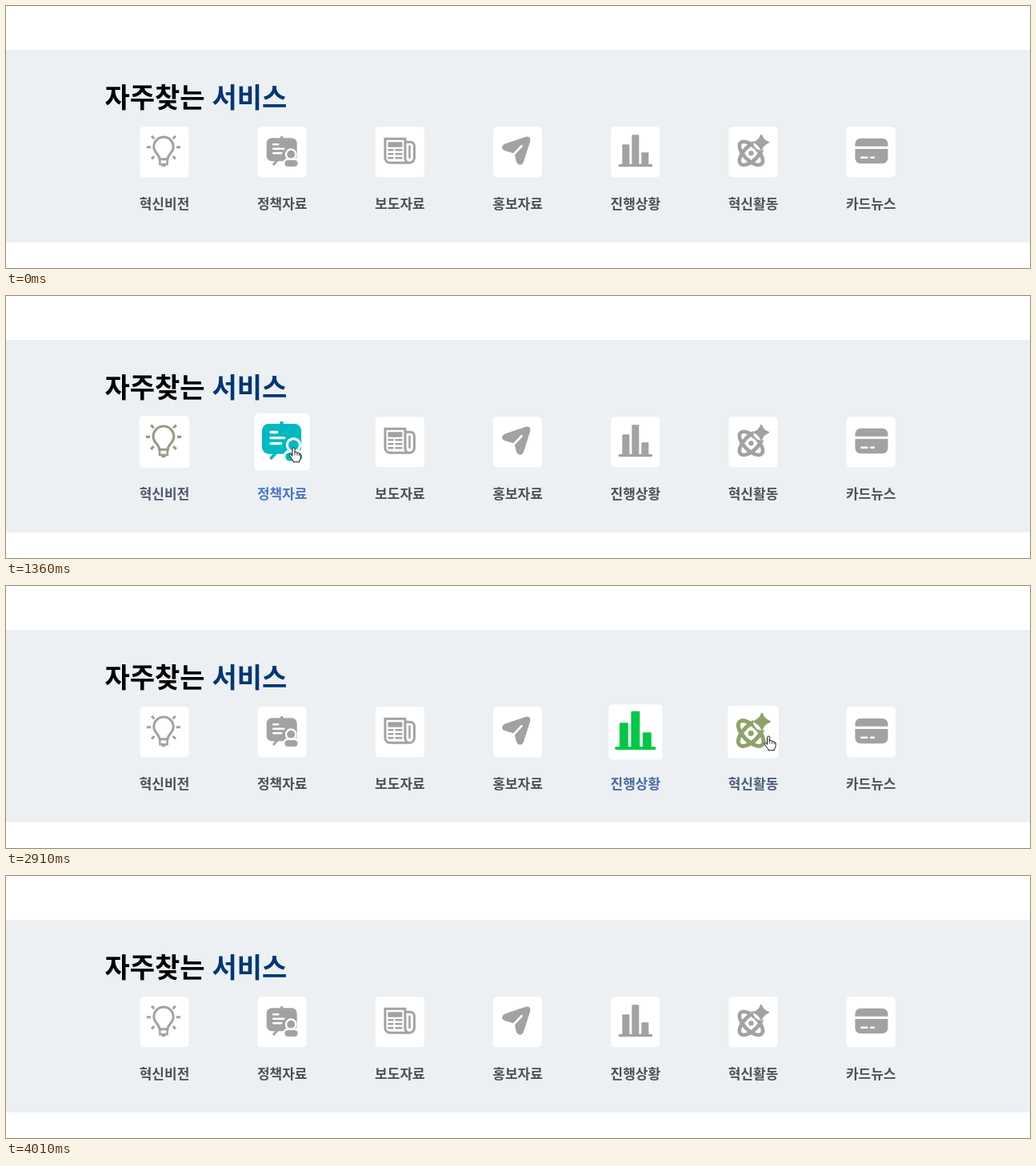
An HTML page for the animation above (4.2 s loop, 1280 by 328 pixels).

```html
<!DOCTYPE html>
<html lang="ko">
<head>
<meta charset="utf-8">
<title>자주찾는 서비스</title>
<style>
  html, body { margin: 0; width: 100%; height: 100%; overflow: hidden; background: #fff; }
  svg { display: block; width: 1280px; height: 328px; }
  text { font-family: "Noto Sans CJK KR", "Noto Sans KR", "Noto Sans CJK", sans-serif; font-weight: 700; }
  .title { font-size: 34px; }
  .label { font-size: 17px; text-anchor: middle; }
  .icon { fill: currentColor; stroke: none; }
  .line { fill: none; stroke: currentColor; stroke-width: 3; }
  .thin { stroke-width: 2.5; }
  .thick { stroke-width: 4.6; }
  .cut { fill: none; stroke: #fff; stroke-width: 2.6; stroke-linecap: round; }
  .gap { stroke: #fff; stroke-width: 2.4; }
  .hole { fill: #fff; }
</style>
</head>
<body>
<svg viewBox="0 0 1280 328" xmlns="http://www.w3.org/2000/svg">
  <rect width="1280" height="328" fill="#fff"/>
  <rect y="55" width="1280" height="241" fill="#ecf0f3"/>
  <text class="title" x="123.5" y="126.6">자주찾는</text>
  <text class="title" x="257.5" y="126.6" fill="#003675">서비스</text>
  <g id="items"></g>
  <g id="cursor" stroke-linejoin="round" stroke-linecap="round">
    <path id="arrow" fill="#fff" stroke="#000" d="M.5 .5V16.5L4.2 13L6.6 18.6L9.2 17.5L6.8 12H12Z"/>
    <path id="beam" fill="none" stroke="#333" stroke-width="1.1" d="M-2.5-5.5H-.8L0-5L.8-5.5H2.5M0-5V5M-2.5 5.5H-.8L0 5L.8 5.5H2.5"/>
    <g id="hand" stroke="#111">
      <path fill="#fff" d="M-1.6 10V1.3Q-1.5 0 0 0Q1.4 0 1.5 1.3V6Q2 5.2 3.2 5.4Q4.3 5.6 4.4 6.6Q5.1 5.9 6.1 6.3Q7 6.7 7 7.6Q8.9 7.2 8.9 9V12Q8.9 14.5 7.2 16.2V17.8H-.4V16.3Q-2 14.6-3.3 12.2L-5 9.8Q-5.6 8.7-4.6 8.2Q-3.4 7.8-2.5 9Z"/>
      <path fill="none" stroke-width=".8" d="M1.5 6V9M4.4 6.6V9.4M7 7.6V9.6"/>
    </g>
  </g>
</svg>
<script>
const LOOP = 4200, FADE = 300, STEP = 67.6, LAST = 59;
const FIRST_X = 198, PITCH = 147.2, CARD_Y = 182.75, HALF_W = 30.5, HALF_H = 31.5;

const bar = (x, h) => `<rect x="${x - 4.5}" y="${16.5 - h}" width="9" height="${h}" rx="1"/>`;
const orbit = angle => `<ellipse class="line thick" rx="18.6" ry="8.8" transform="translate(-2.6 1.6) rotate(${angle})"/>`;

// label and icon, drawn around the card centre
const items = [
  ['혁신비전', `
    <path class="line" d="M-6 9C-6 3-13.2 1-13.2-6.5A12.2 12.2 0 0 1 11.2-6.5C11.2 1 4 3 4 9Z"/>
    <path class="line thin" d="M-5.6 8V15.4H3.6V8"/>
    <path d="M-3.5 16H1.5V18.5H-3.5Z"/>
    <path class="line" d="M-22-6H-17M15-6H20M-16-20L-12.6-16.6M14-20L10.6-16.6M-16 8.6L-12.6 5.2M14 8.6L10.6 5.2"/>`],
  ['정책자료', `
    <rect x="-19.5" y="-17.5" width="38" height="29" rx="6.5"/>
    <rect x="-2.2" y="-20" width="3.4" height="5" rx="1.5"/>
    <path class="line" stroke-linecap="round" d="M-10.5 15.5L-6.5 11"/>
    <path class="cut" d="M-11-9.5H-5M-11-4H2M-11 1.5H-1"/>
    <circle class="gap" cx="11" cy="3" r="6.2"/>
    <rect class="gap" x="2" y="9" width="18.5" height="10.5" rx="5.2"/>`],
  ['보도자료', `
    <path class="line" d="M6.5-12.5H13A5 5 0 0 1 18-7.5V7.5A6 6 0 0 1 12 13.5H-12.5A6 6 0 0 1 -18.5 7.5V-16.5H6.5V8A5.5 5.5 0 0 0 12 13.5"/>
    <path class="line thin" d="M12-8V8"/>
    <rect x="-15" y="-12.5" width="18" height="6.4" rx="1"/>
    <path class="line thin" d="M-15-2.5H-8M-6-2.5H3M-15 2.5H-8M-6 2.5H3M-15 7.5H-8M-6 7.5H3"/>`],
  ['홍보자료', `
    <path d="M10-19Q17-20.5 15.5-13L7.5 12Q5.8 16.5 2 15.8Q-1 15-2 11L-4 2L-14-1Q-20-2.5-19.5-6Q-19-9-15-10.5Z"/>
    <path class="cut" d="M-5.5 3.5L5-7.5"/>`],
  ['진행상황', `
    ${bar(-12, 26)}${bar(0, 38)}${bar(12, 16)}
    <rect x="-21.3" y="15.3" width="42.6" height="3.2" rx="1.5"/>`],
  ['혁신활동', `
    ${orbit(45)}${orbit(-45)}
    <circle cx="-2.6" cy="1.6" r="3.2"/>
    <circle class="hole" cx="10" cy="-12" r="10"/>
    <path stroke="currentColor" stroke-width="2" stroke-linejoin="round" d="M10-21Q12.4-14.4 19-12Q12.4-9.6 10-3Q7.6-9.6 1-12Q7.6-14.4 10-21Z"/>`],
  ['카드뉴스', `
    <rect x="-19.8" y="-17" width="41" height="31.5" rx="7"/>
    <rect class="hole" x="-20.5" y="-7" width="42.5" height="3.2"/>
    <path class="cut" d="M-12 7H-5M0 7H3.6"/>`]
];

// key points of the cursor: time, x, y
const path = [
  [67, 1244, 303], [325, 780, 12], [550, 324, 92], [610, 175.5, 145], [960, 185, 150],
  [1185, 229], [1235, 315], [1360, 361], [1630, 453, 196], [1990, 462, 196],
  [2150, 523], [2212, 609], [2300, 645, 192], [2480, 670], [2600, 756.5], [2825, 817.5],
  [2866, 903.5], [2910, 953, 188], [3160, 964.5], [3204, 1051], [3254, 1063], [3630, 1112], [3745, 1248, 314]
];

const byId = id => document.getElementById(id);
const clamp = v => Math.max(0, Math.min(1, v));
const mix = (a, b, f) => a + (b - a) * f;

function cursorAt(t) {
  let i = 1;
  while (i < path.length - 1 && path[i][0] < t) i++;
  const [t0, x0, y0 = 190] = path[i - 1], [t1, x1, y1 = 190] = path[i];
  const f = clamp((t - t0) / (t1 - t0));
  return [mix(x0, x1, f), mix(y0, y1, f)];
}

// cubic-bezier(.25, .1, .25, 1)
function ease(x) {
  x = clamp(x);
  const bez = (u, a, b) => 3 * u * (1 - u) ** 2 * a + 3 * u * u * (1 - u) * b + u ** 3;
  let lo = 0, hi = 1;
  for (let i = 0; i < 20; i++) {
    const mid = (lo + hi) / 2;
    if (bez(mid, .25, .25) < x) lo = mid; else hi = mid;
  }
  return x === 0 || x === 1 ? x : bez(lo, .1, 1);
}

// the hue turns while the grey gains colour
function iconTint(p) {
  const hue = 35 + 215 * p;
  const sat = 100 * Math.min(1, 5 * p * p);
  const light = Math.max(38, 63.5 - 50 * p);
  return `hsl(${hue}, ${sat}%, ${light}%)`;
}

const labelTint = p => `rgb(${mix(78, 70, p)}, ${mix(80, 134, p)}, ${mix(82, 250, p)})`;

const centre = i => FIRST_X + PITCH * i;

function isOver(i, t) {
  const [x, y] = cursorAt(t);
  return Math.abs(x - centre(i)) <= HALF_W + .6 && Math.abs(y - CARD_Y) <= HALF_H;
}

byId('items').innerHTML = items.map(([label, icon], i) =>
  `<g transform="translate(${centre(i)} ${CARD_Y})">
    <g class="card"><rect x="${-HALF_W}" y="${-HALF_H}" width="${2 * HALF_W}" height="${2 * HALF_H}" rx="4.5" fill="#fff"/>
    <g class="icon">${icon}</g></g>
    <text class="label" y="70.8">${label}</text></g>`
).join('');

const parts = [...byId('items').children].map((g, i) => {
  let from = 0;
  while (!isOver(i, from) && from < LOOP) from++;
  let to = from;
  while (isOver(i, to) && to < LOOP) to++;
  return {
    from, to,
    card: g.querySelector('.card'),
    icon: g.querySelector('.icon'),
    label: g.querySelector('.label')
  };
});

function drawCursor(t) {
  const [x, y] = cursorAt(t);
  const over = parts.some(({ from, to }) => t >= from && t < to);
  const kind = over ? 'hand' : t > 550 && y < 160 ? 'beam' : 'arrow';
  byId('cursor').setAttribute('transform', `translate(${x.toFixed(1)} ${y.toFixed(1)})`);
  byId('cursor').style.display = t > 60 && t < 3780 ? '' : 'none';
  for (const id of ['arrow', 'beam', 'hand']) byId(id).style.display = id === kind ? '' : 'none';
}

function draw(ms) {
  // the picture advances in even steps, then rests until the loop ends
  const t = Math.min(LAST, Math.floor((ms % LOOP + 2) / STEP)) * 67.8;
  for (const { from, to, card, icon, label } of parts) {
    const p = ease((t - from) / FADE) * (1 - ease((t - to) / FADE));
    const scale = `scale(${1 + .2 * p})`;
    card.setAttribute('transform', scale);
    icon.setAttribute('transform', scale);
    icon.style.color = iconTint(p);
    label.style.fill = labelTint(p);
  }
  drawCursor(t);
}

const start = performance.now();
function tick() {
  draw(performance.now() - start);
  requestAnimationFrame(tick);
}
tick();
</script>
</body>
</html>
```
